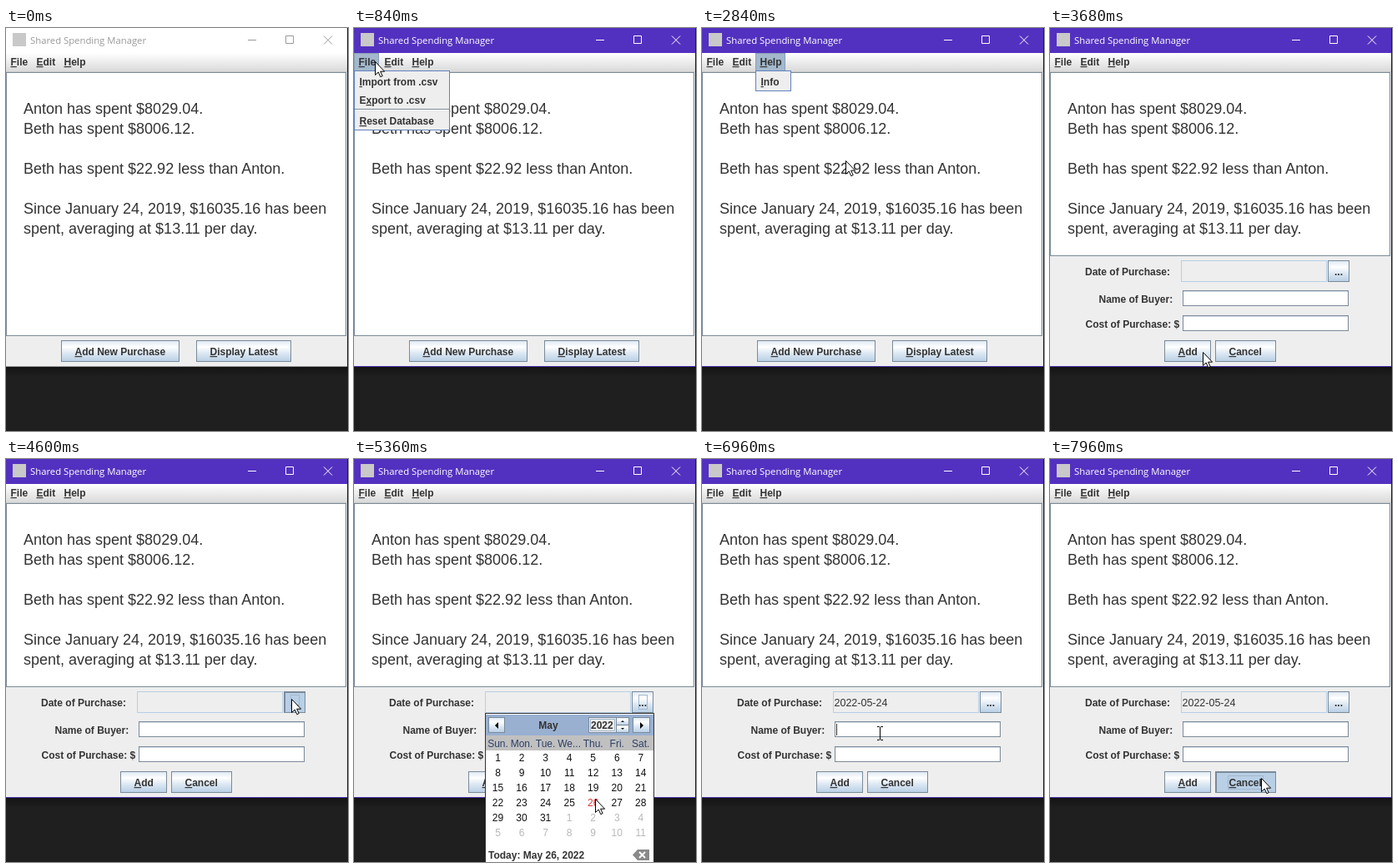
These frames come from a looping animation (410 by 484 pixels, 8000 ms). An HTML page:

```html
<!DOCTYPE html>
<html>
<head>
<meta charset="utf-8">
<title>Shared Spending Manager</title>
<style>
html, body { margin: 0; width: 100%; height: 100%; overflow: hidden; background: #1f1f1f; }
svg { display: block; width: 410px; height: 484px; font-kerning: none; }
text { white-space: pre; fill: #333; }
.body { font: 18px "Liberation Sans", Arial, sans-serif; }
.bold { font: bold 12px "Liberation Sans", Arial, sans-serif; }
.plain { font: 12px "Liberation Sans", Arial, sans-serif; }
.title { font: 11.3px "Open Sans", sans-serif; }
.date { font-size: 12.5px; }
.mid { text-anchor: middle; }
.u { text-decoration: underline; }
rect { shape-rendering: crispEdges; }
</style>
</head>
<body>
<svg id="stage" viewBox="0 0 410 484" xmlns="http://www.w3.org/2000/svg"></svg>
<script>
const LOOP = 8000, STEP = 40;
const EDGE = '#7a8a99', PALE = '#b8cfe5', RING = '#a3b8cc';

// ---- drawing helpers
const box = (x, y, w, h, fill, extra = '') =>
  `<rect x="${x}" y="${y}" width="${w}" height="${h}" fill="${fill}" ${extra}/>`;
const frame = (x, y, w, h, stroke, fill = 'none') =>
  box(x + .5, y + .5, w - 1, h - 1, fill, `stroke="${stroke}"`);
const label = (x, y, s, cls = 'bold', extra = '') =>
  `<text x="${x}" y="${y}" class="${cls}" ${extra}>${s.replace(/_(.)/, '<tspan class="u">$1</tspan>')}</text>`;
const group = (id, inner) => `<g id="${id}">${inner}</g>`;
const line = (d, stroke, w = 1) => `<path d="${d}" fill="none" stroke="${stroke}" stroke-width="${w}"/>`;
const gradient = (id, stops) =>
  `<linearGradient id="${id}" x2="0" y2="1">${stops.map(([o, c]) =>
    `<stop offset="${o}" stop-color="${c}"/>`).join('')}</linearGradient>`;

function button(id, x, y, w, h, text, tx, ty, ring) {
  return frame(x, y, w, h, EDGE, 'url(#metal)') +
    group(id + 'Roll', frame(x, y, w, h, PALE) + frame(x + 2, y + 2, w - 4, h - 4, PALE) +
      frame(x + 1, y + 1, w - 2, h - 2, EDGE)) +
    group(id + 'Press', frame(x, y, w, h, EDGE, PALE) + box(x + 1, y + 1, w - 2, 1, EDGE) +
      box(x + 1, y + 1, 1, h - 2, EDGE)) +
    group(id + 'Ring', frame(...ring, RING)) +
    label(tx, ty, text);
}

// items: labels, with '-' for a separator
function menu(id, x, w, headW, name, items) {
  let y = 53, rows = '';
  for (const item of items) {
    if (item === '-') { rows += box(x + 1, y, w - 2, 1, EDGE) + box(x + 1, y + 1, w - 2, 1, '#fff'); y += 3; }
    else { rows += label(x + 6.5, y + 16, item); y += 22; }
  }
  return group(id, box(x, 30, headW, 22, RING) + frame(x, 30, headW, 22, '#8b9fb5') +
    label(x + 5.5, 45, name) + frame(x, 51, w, y - 50, '#6382bf', '#eee') + rows);
}

function calendar() {
  const col = i => 172.5 + i * 28.55;
  let s = box(157, 305, 203, 180, '#333') + box(158, 306, 201, 178, '#fff') +
    box(158, 307, 201, 25, '#99b0d1') + box(158, 332, 201, 18, '#c0c0c0') +
    frame(161, 310, 20, 19, EDGE, 'url(#metal)') + frame(334, 310, 21, 19, EDGE, 'url(#metal)') +
    '<path d="M173 316v8l-4-4zM343 316v8l4-4z"/>' +
    label(233, 324, 'May', 'bold mid') +
    frame(281, 310, 49, 19, EDGE, '#eee') + frame(283, 312, 30, 15, RING, '#eee') +
    label(284, 324, '2022') +
    frame(314, 310, 16, 10, EDGE, 'url(#metal)') + frame(314, 319, 16, 10, EDGE, 'url(#metal)') +
    '<path d="M320 316h4l-2-2zM320 323h4l-2 2z"/>';
  ['Sun.', 'Mon.', 'Tue.', 'We...', 'Thu.', 'Fri.', 'Sat.'].forEach((d, i) =>
    s += label(col(i), 346, d, 'plain mid', 'style="fill:#2d3f66"'));
  s += group('picked', box(216, 405, 28, 17, '#a3b8cc'));
  for (let n = 0; n < 42; n++) {
    const fill = n > 30 ? '#b8b8b8' : n === 25 ? '#d93636' : '#111';
    s += label(col(n % 7), 363 + 18 * (n / 7 | 0), String(n % 31 + 1), 'plain mid', `style="fill:${fill}"`);
  }
  return s + label(161, 480, 'Today: May 26, 2022') +
    '<path d="M334 475.5l6-6.5h14v13h-14z" fill="#8a8a8a"/>' +
    line('M342 472l7 7m0-7l-7 7', '#fff', 2);
}

const field = y => frame(159, y, 199, 19, EDGE, '#fff') + box(160, y + 1, 197, 1, '#d5dfe9');

// ---- scene
const stage = document.getElementById('stage');
stage.innerHTML =
  '<defs>' +
  gradient('metal', [[0, '#dde8f3'], [.3, '#fff'], [.6, '#dde8f3'], [1, PALE]]) +
  gradient('bar', [[0, '#fff'], [1, '#dadada']]) +
  gradient('shade', [[0, '#141414'], [1, '#1f1f1f']]) +
  '</defs>' +
  box(0, 0, 410, 484, '#1f1f1f') + box(0, 407, 410, 12, 'url(#shade)') +
  box(0, 30, 409, 376, '#eee') +
  box(0, 0, 409, 30, '#fff', 'id="caption"') + box(0, 406, 409, 1, '#999', 'id="rim"') +
  box(8, 6, 16, 16, '#c9c9c9') +
  label(29, 19, 'Shared Spending Manager', 'title', 'id="name"') +
  '<path id="ctl" d="M290 14.5h10M335.5 9.5h9v9h-9zM381 9.5l10 10m0-10l-10 10" fill="none"/>' +
  box(0, 30, 409, 22, 'url(#bar)') + box(0, 52, 409, 1, '#ccc') +
  label(5.5, 45, '_File') + label(36.5, 45, '_Edit') + label(69.5, 45, '_Help') +
  group('home', frame(0, 53, 408, 317, EDGE, '#fff') +
    button('buy', 66, 375, 142, 26, '_Add New Purchase', 82.5, 393, [80, 380, 114, 17]) +
    button('show', 228, 375, 114, 26, '_Display Latest', 244.5, 393, [242, 380, 86, 17])) +
  group('form', frame(0, 53, 408, 221, EDGE, '#fff') +
    label(42, 297, 'Date of Purchase:') + label(58.5, 330, 'Name of Buyer:') +
    label(42.5, 360, 'Cost of Purchase: $') +
    frame(157, 279, 175, 26, PALE, '#eee') +
    label(158.5, 297, '2022-05-24', 'plain date', 'id="day"') +
    button('pick', 333, 279, 26, 26, '...', 341, 297, [341, 283, 11, 18]) +
    field(315) + field(345) +
    box(161, 318, 1, 14, '#333', 'id="caretA"') + box(161, 348, 1, 14, '#333', 'id="caretB"') +
    button('add', 137, 375, 56, 26, '_Add', 153.5, 393, [152, 380, 26, 17]) +
    button('cancel', 198, 375, 73, 26, '_Cancel', 214.5, 393, [213, 380, 43, 17])) +
  [[103, 'Anton has spent $8029.04.'], [127, 'Beth has spent $8006.12.'],
   [175, 'Beth has spent $22.92 less than Anton.'],
   [223, 'Since January 24, 2019, $16035.16 has been'],
   [247, 'spent, averaging at $13.11 per day.']].map(([y, s]) => label(21, y, s, 'body')).join('') +
  menu('fileMenu', 0, 115, 30, '_File', ['_Import from .csv', 'E_xport to .csv', '-', '_Reset Database']) +
  menu('editMenu', 31, 105, 32, '_Edit', ['_Edit Purchase', '-', '_Undo Latest', '-', '_Delete Latest']) +
  menu('helpMenu', 64, 43, 36, '_Help', ['_Info']) +
  group('cal', calendar()) +
  group('mouse',
    '<path id="arrow" d="M.5 .5v16l3.7-3.5 2.6 5.7 2.4-1.1-2.6-5.4h5z" fill="#fff" stroke="#000"/>' +
    '<path id="sizer" d="M.5-10.5l4.5 5h-3v11h3l-4.5 5-4.5-5h3v-11h-3z" fill="#fff" stroke="#000"/>' +
    '<path id="beam" d="M-3-7.5h2.5l1 1 1-1h2.5M-3 8.5h2.5l1-1 1 1h2.5M.5-7v15" fill="none" stroke="#000"/>');

const el = {};
stage.querySelectorAll('[id]').forEach(n => el[n.id] = n);
const show = (id, on) => el[id].style.display = on ? '' : 'none';

// ---- pointer path: time, x, y
const keys = [
  [120, -12, 160], [320, 18, 108], [460, 40, 66], [640, 25, 40], [1300, 25, 40],
  [1560, 45, 38], [1820, 45, 38], [2080, 80, 40], [2280, 82, 42], [2640, 124, 93],
  [2840, 172, 159], [3060, 188, 262], [3480, 183, 389], [3980, 183, 389],
  [4240, 250, 348], [4560, 341, 289], [4800, 343, 287], [5060, 330, 345], [5360, 289, 408],
  [5640, 232, 413], [5720, 224, 411], [6220, 224, 411], [6440, 216, 372], [6720, 208, 325],
  [6860, 208, 325], [7120, 222, 340], [7360, 216, 353], [7500, 216, 353], [7760, 240, 377], [7960, 253, 383], [8000, 253, 383]
];

// monotone cubic interpolation, so rests stay still
function along(t, a) {
  const slope = i => (keys[i + 1][a] - keys[i][a]) / (keys[i + 1][0] - keys[i][0]);
  const tangent = i => {
    if (i < 1 || i > keys.length - 2) return 0;
    const p = slope(i - 1), q = slope(i);
    return p * q <= 0 ? 0 : 2 * p * q / (p + q);
  };
  if (t <= keys[0][0]) return keys[0][a];
  let i = 0;
  while (i < keys.length - 2 && t >= keys[i + 1][0]) i++;
  const [p, q] = [keys[i], keys[i + 1]], d = q[0] - p[0], u = (t - p[0]) / d, v = 1 - u;
  return p[a] * (1 + 2 * u) * v * v + q[a] * u * u * (3 - 2 * u) +
    d * u * v * (tangent(i) * v - tangent(i + 1) * u);
}

function draw(time) {
  const t = Math.floor(time / STEP) * STEP;
  const x = Math.round(along(t, 1)), y = Math.round(along(t, 2));
  const within = (l, top, w, h) => x >= l && x < l + w && y >= top && y < top + h;
  const from = (a, b = LOOP) => t >= a && t < b;
  const active = from(840), form = from(3680);

  el.caption.setAttribute('fill', active ? '#5331c0' : '#fff');
  el.rim.setAttribute('fill', active ? '#4a2fa8' : '#999');
  el.name.style.fill = active ? '#fff' : '#999';
  el.ctl.setAttribute('stroke', active ? '#fff' : '#999');

  show('fileMenu', from(840, 1480));
  show('editMenu', from(1480, 1960));
  show('helpMenu', from(1960, 3600));
  show('home', !form);
  show('form', form);

  show('buyRoll', within(66, 375, 142, 26));
  show('buyPress', from(3600, 3680));
  show('buyRing', from(3600, 3680));
  ['showRoll', 'showPress', 'showRing', 'addPress', 'addRing'].forEach(id => show(id, false));
  show('addRoll', from(4000) && within(137, 375, 56, 26));
  show('pickRoll', from(4000, 4640) && within(333, 279, 26, 26));
  show('pickPress', from(4600, 4640));
  show('pickRing', from(4600, 6640));
  show('cancelRoll', from(6240, 7960) && within(198, 375, 73, 26));
  show('cancelPress', from(7960));
  show('cancelRing', from(7960));

  show('cal', from(4640, 6000));
  show('picked', from(5920));
  show('day', from(6080));
  show('caretA', from(6640, 7320));
  show('caretB', from(7320, 7960));

  const sizer = from(6040, 6600) && y > 401;
  const beam = from(6080) && (within(159, 315, 199, 19) || within(159, 345, 199, 19));
  show('mouse', t >= 160);
  show('arrow', !sizer && !beam);
  show('sizer', sizer);
  show('beam', beam);
  el.mouse.setAttribute('transform', `translate(${x} ${y + (sizer ? 1 : 0)})`);
}

const start = performance.now();
function tick() {
  draw((performance.now() - start) % LOOP);
  requestAnimationFrame(tick);
}
tick();
</script>
</body>
</html>
```
